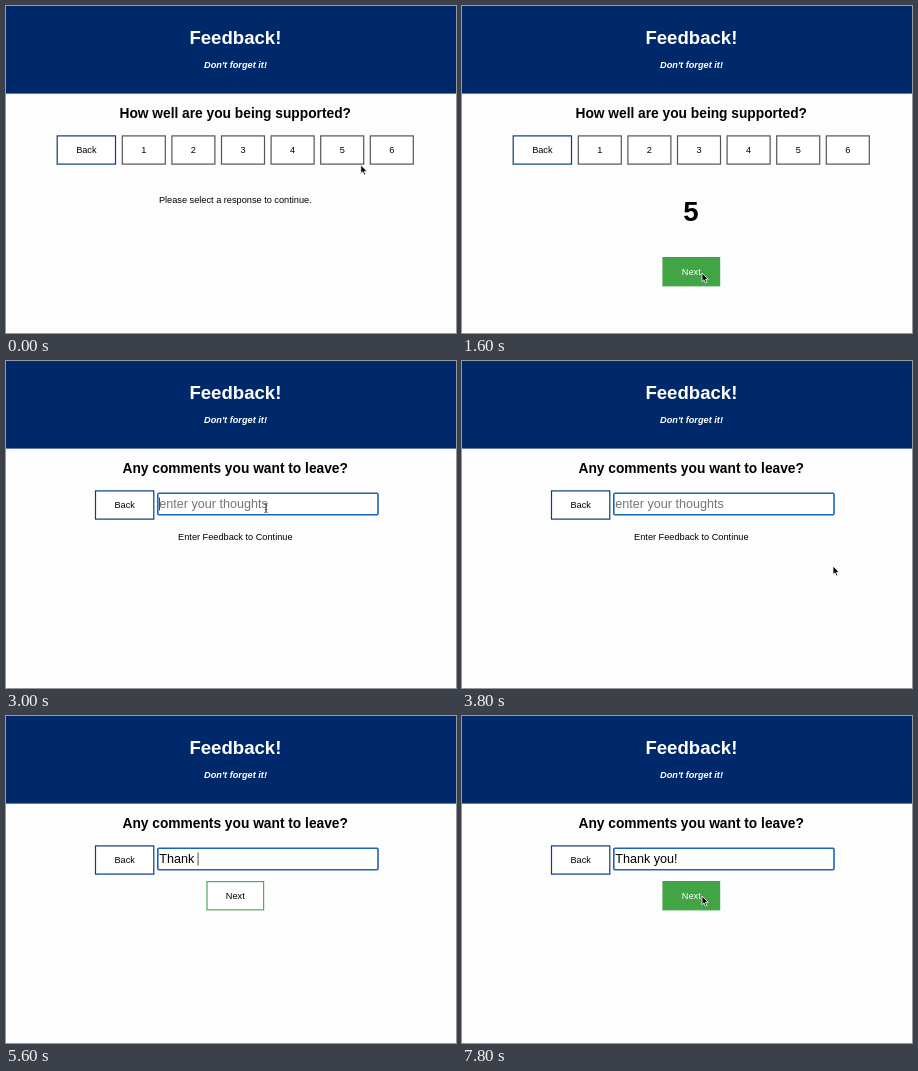
Recreate the animation shown at these times as an HTML page. Size 450 by 327 pixels, loop 8000 ms.

```html
<!DOCTYPE html>
<html lang="en">
<head>
<meta charset="utf-8">
<title>Feedback</title>
<style>
html, body { margin: 0; width: 100%; height: 100%; overflow: hidden; background: #fdfdfe; }
svg { display: block; width: 450px; height: 327px; }
text { font: 9.2px "Liberation Sans", Arial, sans-serif; fill: #000; text-anchor: middle; }
.h1 { font-size: 18.6px; font-weight: bold; fill: #fff; }
.h2 { font-size: 13.75px; font-weight: bold; }
.sub { font-weight: bold; font-style: italic; fill: #fff; }
.big { font-size: 27.6px; font-weight: bold; }
.field { font-size: 12.6px; text-anchor: start; white-space: pre; }
.btn rect { fill: #fff; stroke: var(--c); stroke-width: 1.2; }
.btn.hover rect { fill: var(--h); stroke: var(--h); }
.btn.hover text { fill: #fff; }
</style>
</head>
<body>
<svg id="stage" viewBox="0 0 450 327">
  <rect width="450" height="327" fill="#fdfdfe"/>
  <rect width="450" height="87.6" fill="#00296b"/>
  <text class="h1" x="229.4" y="37.6">Feedback!</text>
  <text class="sub" x="229.5" y="62.2">Don't forget it!</text>
  <g id="rating">
    <text class="h2" x="229.2" y="111.7">How well are you being supported?</text>
    <text id="hint" x="229.3" y="197">Please select a response to continue.</text>
    <text id="score" class="big" x="229" y="214.7">5</text>
  </g>
  <g id="comments">
    <text class="h2" x="229.2" y="111.7">Any comments you want to leave?</text>
    <rect id="box" fill="#fff"/>
    <text id="typed" class="field" x="153.2" y="147.3"></text>
    <rect id="caret" y="136.5" width="0.7" height="13" fill="#000"/>
    <text id="enter" x="229.3" y="179">Enter Feedback to Continue</text>
  </g>
  <g id="pointer">
    <path id="arrow" d="M0 0V8.6L2 6.8L3.4 10L4.9 9.4L3.5 6.3H6.2Z" fill="#000" stroke="#fff" stroke-width="0.8"/>
    <path id="beam" d="M-1.6 -4.5Q0 -4.5 0 -3.4Q0 -4.5 1.6 -4.5M0 -3.6V3.6M-1.6 4.5Q0 4.5 0 3.4Q0 4.5 1.6 4.5M-1 1.6H1" fill="none" stroke="#222" stroke-width="0.8"/>
  </g>
</svg>
<script>
const LOOP = 8000, STEP = 200;
const NAVY = '#0b3d80', GREY = '#555', DARK = '#4b4b4b', GREEN = '#4caf50', LEAF = '#41a445';
const NS = 'http://www.w3.org/2000/svg';
const $ = id => document.getElementById(id);

function add(parent, tag, attrs) {
  const el = document.createElementNS(NS, tag);
  set(el, attrs);
  return parent.appendChild(el);
}

function set(el, attrs) {
  for (const k in attrs) el.setAttribute(k, attrs[k]);
}

function show(el, on) {
  el.style.display = on ? '' : 'none';
}

function button(parent, label, x, y, w, color, hover) {
  const g = add(parent, 'g', { class: 'btn', style: `--c:${color};--h:${hover}` });
  add(g, 'rect', { x: x + 0.6, y: y + 0.6, width: w - 1.2, height: 28.2 });
  add(g, 'text', { x: x + w / 2, y: y + 17.8 }).textContent = label;
  return g;
}

const rating = $('rating'), comments = $('comments');
button(rating, 'Back', 50.6, 129.3, 59.5, NAVY, NAVY);
const digits = [1, 2, 3, 4, 5, 6].map((n, i) =>
  button(rating, n, 115.7 + i * 49.6, 129.3, 44.2, GREY, DARK));
const nextRating = button(rating, 'Next', 200.4, 251, 57.8, GREEN, LEAF);
button(comments, 'Back', 88.9, 129.3, 59.5, NAVY, NAVY);
const nextComment = button(comments, 'Next', 200.4, 165, 57.8, GREEN, LEAF);

const MESSAGE = 'Thank you!', PROMPT = 'enter your thoughts';
const PICK = 800, TURN = 2000, FOCUS = 3000, TYPE = 4600, WAKE = 6800;

// time, x, y
const path = [
  [0, 354.8, 159], [400, 354.8, 159], [600, 348, 148], [1000, 346, 149],
  [1200, 322, 182], [1400, 264, 246], [1600, 240, 267], [2200, 240, 266],
  [2400, 245, 228], [2600, 255, 172], [2800, 260, 147], [3200, 260, 147],
  [3400, 275, 154], [3600, 332, 186], [3800, 371, 205], [4000, 375, 207],
  [6600, 375, 207], [6800, 383, 206], [7000, 375, 204], [7200, 340, 197],
  [7400, 295, 188], [7600, 262, 182], [7800, 240, 180], [8000, 240, 180]
];

function pointerAt(t) {
  const i = Math.max(1, path.findIndex(p => p[0] >= t));
  const [t0, x0, y0] = path[i - 1], [t1, x1, y1] = path[i];
  const k = (t - t0) / (t1 - t0);
  return [x0 + (x1 - x0) * k, y0 + (y1 - y0) * k];
}

const inside = (x, y, l, t, r, b) => x > l && x < r && y > t && y < b;

function draw(now) {
  const t = Math.floor((now % LOOP) / STEP) * STEP;
  const [x, y] = pointerAt(t);
  const second = t >= TURN, picked = t >= PICK, focused = t >= FOCUS;
  show(rating, !second);
  show(comments, second);

  show($('hint'), !picked);
  show($('score'), picked);
  show(nextRating, picked);
  digits[4].classList.toggle('hover', inside(x, y, 314, 129, 358, 158.6));
  nextRating.classList.toggle('hover', inside(x, y, 200, 251, 258, 280));

  const count = t < TYPE ? 0 : Math.min(MESSAGE.length, 1 + Math.floor((t - TYPE) / STEP));
  const typed = $('typed');
  typed.textContent = count ? MESSAGE.slice(0, count) : PROMPT;
  typed.style.fill = count ? '#000' : '#757575';
  set($('box'), focused
    ? { x: 151.8, y: 132.3, width: 220.2, height: 21.4, rx: 1.2, stroke: '#1965b8', 'stroke-width': 1.6 }
    : { x: 152, y: 132.5, width: 219.8, height: 21, rx: 0, stroke: '#767676', 'stroke-width': 1 });
  const typing = count > 0 && t < TYPE + MESSAGE.length * STEP;
  show($('caret'), focused && (typing || t % 1000 < 500));
  $('caret').setAttribute('x', count ? 153.2 + typed.getComputedTextLength() : 153.2);
  show($('enter'), !count);
  show(nextComment, count > 0);
  nextComment.classList.toggle('hover', inside(x, y, 200, 165, 258, 194));

  const overField = second && inside(x, y, 151, 131, 373, 155);
  show($('pointer'), t < TYPE || t >= WAKE);
  show($('arrow'), !overField);
  show($('beam'), overField);
  $('pointer').setAttribute('transform', `translate(${x} ${y})`);
}

const start = performance.now();
function tick() {
  draw(performance.now() - start);
  requestAnimationFrame(tick);
}
tick();
</script>
</body>
</html>
```
